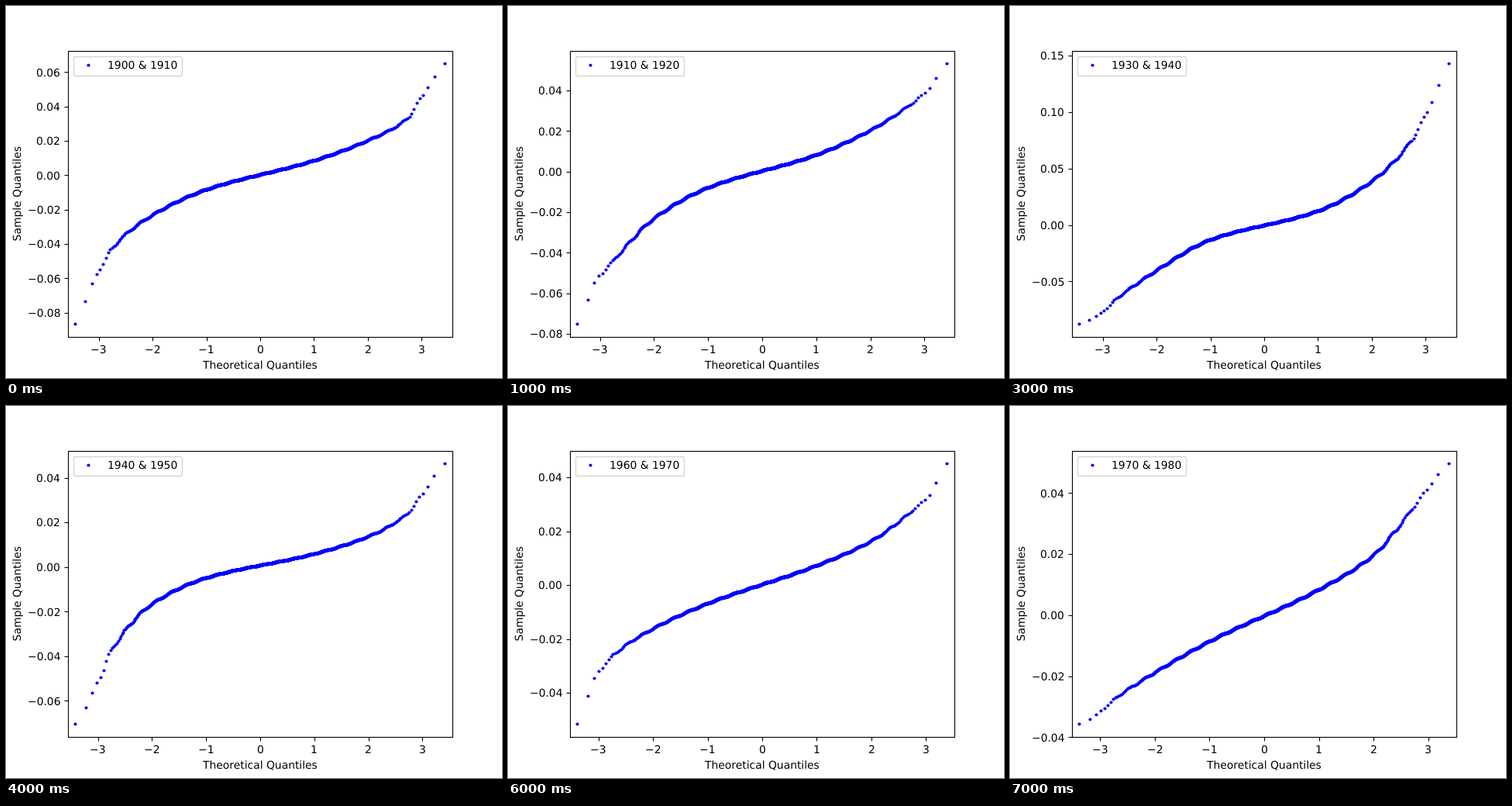
Animation, 640 px wide and 480 px high, one loop 8 s. Source, as an HTML page with a canvas:

```html
<!DOCTYPE html>
<html lang="en">
<head>
<meta charset="utf-8">
<title>Quantile plots by decade</title>
<style>
html, body { margin: 0; width: 100%; height: 100%; overflow: hidden; background: #fff; }
canvas { display: block; }
</style>
</head>
<body>
<canvas id="stage" width="640" height="480"></canvas>
<script>
const ctx = document.getElementById('stage').getContext('2d');
const LEFT = 80.5, RIGHT = 576.5, TOP = 58.5, BOTTOM = 427.5;
const MID_X = 328, HALF_X = 238.46, DATA_BOTTOM = 410.4, DATA_HEIGHT = 336;
const KEY_Z = [1, 2, 2.7, 3.1];

// Inverse normal distribution (rational approximation).
function quantile(p) {
  if (p > 0.5) return -quantile(1 - p);
  const t = Math.sqrt(-2 * Math.log(p));
  return (2.515517 + t * (0.802853 + t * 0.010328)) /
    (1 + t * (1.432788 + t * (0.189269 + t * 0.001308))) - t;
}

// Values in thousandths: minimum, values at -KEY_Z and +KEY_Z, maximum.
const sample = (count, ...values) => ({ count, values });
const blend = (count, a, b, w) =>
  sample(count, ...a.values.map((v, i) => v + (b.values[i] - v) * w));

const s1900 = sample(3340, -86.6, -62.5, -40.9, -23.3, -8.5, 8.4, 20.1, 32, 50.2, 64.9);
const s1910 = sample(3150, -75.2, -55.2, -42.5, -23.2, -8, 8.2, 20.3, 32.2, 41.1, 53.3);
const s1930 = sample(3340, -87.7, -80.6, -64, -40.5, -13.3, 12.2, 38.5, 72, 107, 142.7);
const s1940 = sample(3150, -70.4, -57, -35.5, -16.7, -5, 5.8, 13.6, 23.3, 36, 46.3);
const s1950 = sample(2850, -67.5, -39, -24.3, -13.7, -5.2, 6.1, 13, 18.8, 24.5, 40.5);
const s1970 = sample(2750, -35.72, -33.2, -27.1, -18.9, -8.7, 8.3, 19.6, 34.5, 44, 49.66);
const charts = [s1900, s1910, blend(3340, s1910, s1930, 0.4), s1930,
  s1940, s1950, blend(2800, s1950, s1970, 0.5), s1970];

// Monotone cubic curve through the key points.
function curve(xs, ys) {
  const slopes = xs.slice(1).map((x, i) => (ys[i + 1] - ys[i]) / (x - xs[i]));
  const tangents = xs.map((_, i) => {
    const a = slopes[i - 1] ?? slopes[i], b = slopes[i] ?? a;
    return 2 * a * b / (a + b);
  });
  return x => {
    let i = 0;
    while (i < xs.length - 2 && x > xs[i + 1]) i++;
    const h = xs[i + 1] - xs[i], t = (x - xs[i]) / h, u = 1 - t;
    return u * u * ((1 + 2 * t) * ys[i] + t * h * tangents[i]) +
      t * t * ((3 - 2 * t) * ys[i + 1] - u * h * tangents[i + 1]);
  };
}

function dot(x, y) {
  ctx.beginPath();
  ctx.arc(Math.floor(x) + 0.5, Math.floor(y) + 0.5, 2.08, 0, 2 * Math.PI);
  ctx.fill();
}

function line(x1, y1, x2, y2) {
  ctx.beginPath();
  ctx.moveTo(x1, y1);
  ctx.lineTo(x2, y2);
  ctx.stroke();
}

// Text on whole pixels; anchor 0 is left, 0.5 centre, 1 right.
function text(str, x, y, anchor) {
  ctx.fillText(str, Math.round(x - anchor * ctx.measureText(str).width), Math.round(y));
}

const label = (v, digits) => (v < 0 ? '\u2212' : '') + Math.abs(v).toFixed(digits);

function drawPoints({ count, values }, toX, toY, zMax) {
  const keys = [...KEY_Z, zMax];
  const valueAt = curve([...keys.map(z => -z).reverse(), ...keys], values);
  ctx.fillStyle = '#00f';
  for (let i = 1; i <= count; i++) {
    const z = quantile(i / (count + 1));
    // A slight ripple bunches the points as in sampled data.
    const ripple = 0.02 * Math.sin(24 * Math.PI * z / zMax);
    dot(toX(z), toY(valueAt(z + ripple)));
  }
}

function drawAxes(toX, toY, lo, hi) {
  ctx.strokeStyle = ctx.fillStyle = '#000';
  ctx.lineWidth = 1.11;
  ctx.strokeRect(LEFT, TOP, RIGHT - LEFT, BOTTOM - TOP);
  for (let v = -3; v <= 3; v++) {
    const x = Math.round(toX(v)) + 0.5;
    line(x, BOTTOM, x, BOTTOM + 5);
    text(label(v, 0), toX(v), 448, 0.5);
  }
  const step = hi - lo > 200 ? 50 : 20;
  const margin = (hi - lo) * 0.05 + step / 1000;
  for (let k = Math.ceil((lo - margin) / step); k * step <= hi + margin; k++) {
    const y = toY(k * step), tickY = Math.round(y) + 0.5;
    line(LEFT - 5, tickY, LEFT, tickY);
    text(label(k * step / 1000, 2), 70.3, y + 5.3, 1);
  }
  text('Theoretical Quantiles', MID_X, 468, 0.5);
  ctx.save();
  ctx.translate(19, 242.4);
  ctx.rotate(-Math.PI / 2);
  text('Sample Quantiles', 0, 0, 0.5);
  ctx.restore();
}

function drawLegend(year) {
  ctx.strokeStyle = 'rgba(204, 204, 204, 0.8)';
  ctx.lineWidth = 1.39;
  ctx.beginPath();
  ctx.roundRect(87.5, 65.5, 140, 25, 2.8);
  ctx.stroke();
  text(`${year} & ${year + 10}`, 131, 81, 0);
  ctx.fillStyle = '#00f';
  dot(106, 76);
}

function draw(index) {
  const chart = charts[index];
  const lo = chart.values[0], hi = chart.values.at(-1);
  const zMax = -quantile(1 / (chart.count + 1));
  const toX = z => MID_X + z / zMax * HALF_X;
  const toY = v => DATA_BOTTOM - (v - lo) / (hi - lo) * DATA_HEIGHT;

  ctx.fillStyle = '#fff';
  ctx.fillRect(0, 0, 640, 480);
  ctx.font = '13.89px "DejaVu Sans", sans-serif';
  ctx.textRendering = 'geometricPrecision';
  drawPoints(chart, toX, toY, zMax);
  drawAxes(toX, toY, lo, hi);
  drawLegend(1900 + index * 10);
}

let shown = -1;
function tick() {
  const index = Math.floor(performance.now() / 1000) % charts.length;
  if (index !== shown) draw(shown = index);
  requestAnimationFrame(tick);
}
tick();
</script>
</body>
</html>
```
